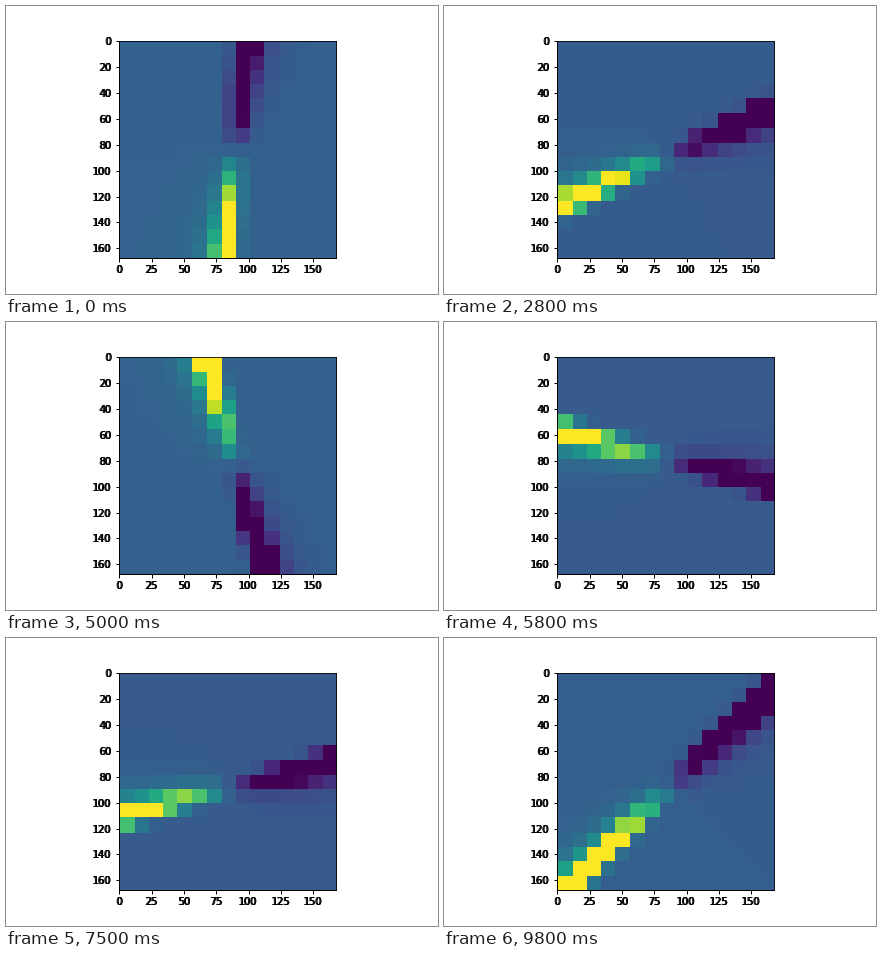
Recreate the animation shown at these times as a matplotlib script. Size 432 by 288 pixels, loop 9900 ms.

```python
import numpy as np
import matplotlib.pyplot as plt
from matplotlib.animation import FuncAnimation

FRAMES, INTERVAL = 99, 100
CELLS, SIZE = 15, 168
SWING, STEP = 85, 10          # degrees, degrees per frame
HALF = 2 * SWING // STEP      # frames from one extreme to the other
GAIN, OFFSET = 0.195, 0.45

plt.rcParams["font.family"] = "DejaVu Sans"
plt.rcParams["font.size"] = 10

upscale = np.arange(SIZE) * CELLS // SIZE
row, col = np.mgrid[:CELLS, :CELLS]
X, Y = col - CELLS // 2, CELLS // 2 - row


def bar_angle(n):
    """Triangle wave between +SWING and -SWING."""
    k = n % (2 * HALF)
    return SWING - STEP * min(k, 2 * HALF - k)


def field(n):
    """Bright and dark halves of a bar with a soft tail towards the horizontal."""
    angle = bar_angle(n)
    t = np.radians(abs(angle))
    y = Y * np.sign(angle)
    along = X * np.cos(t) + y * np.sin(t)
    off = (X * np.sin(t) - y * np.cos(t) - OFFSET) * np.sign(along)
    tail = 1 / (1 + np.abs(off / 0.58) ** 2.5)
    edge = np.exp(-0.5 * (off / 0.4) ** 2)
    base = 0.28 + 0.032 * abs(angle) / SWING
    cells = base - GAIN * along * np.where(off > 0, tail, edge)
    return np.clip(cells, 0, 1)[np.ix_(upscale, upscale)]


fig, ax = plt.subplots(figsize=(6, 4), dpi=72)
fig.subplots_adjust(left=0.125, right=0.9, bottom=0.125, top=0.88)
image = ax.imshow(field(0), cmap="viridis", vmin=0, vmax=1,
                  interpolation="nearest")
xticks, yticks = range(0, 151, 25), range(0, 161, 20)
ax.set_xticks(xticks)
ax.set_yticks(yticks)
ax.tick_params(width=1)
for side, spine in ax.spines.items():
    spine.set_linewidth(1 if side in ("left", "bottom") else 0.8)


def overprint(value, axis, shift):
    """Print a tick label again so that its strokes look heavier."""
    if axis == "x":
        ax.annotate(str(value), (value, 0), xycoords=("data", "axes fraction"),
                    xytext=(shift, -7), textcoords="offset points",
                    ha="center", va="top")
    else:
        ax.annotate(str(value), (0, value), xycoords=("axes fraction", "data"),
                    xytext=(shift - 7, 0), textcoords="offset points",
                    ha="right", va="center_baseline")


for shift in (0, -1):
    for v in xticks:
        overprint(v, "x", shift)
    for v in yticks:
        overprint(v, "y", shift)


def update(n):
    image.set_data(field(n))
    return (image,)


anim = FuncAnimation(fig, update, frames=FRAMES, interval=INTERVAL,
                     repeat=True, repeat_delay=0, blit=False)
plt.show()
```
